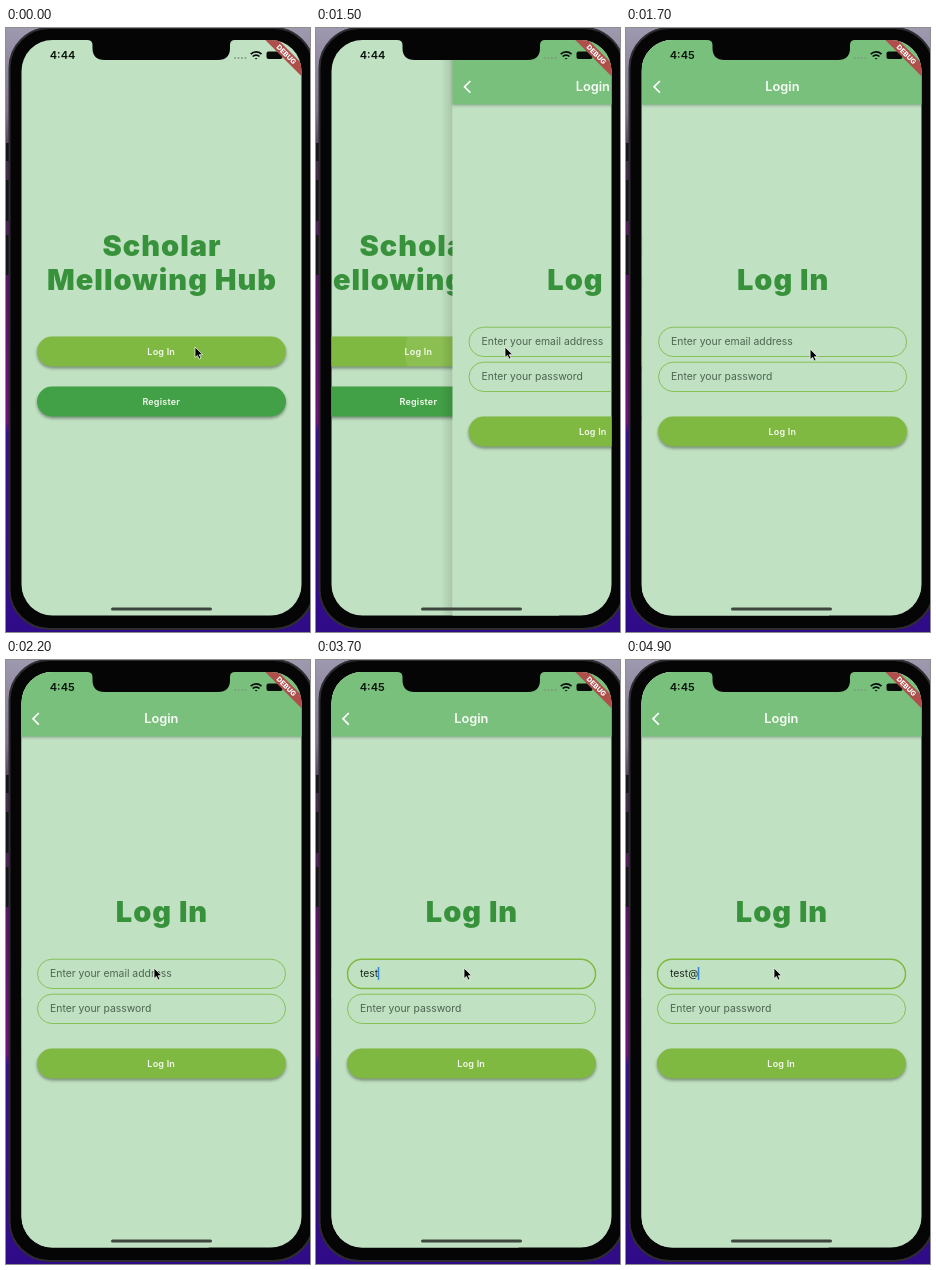
An HTML page for the animation above (5000 ms loop, 304 px wide and 604 px high).

```html
<!DOCTYPE html>
<html lang="en">
<head>
<meta charset="utf-8">
<title>Login walkthrough</title>
<style>
html, body { margin: 0; width: 100%; height: 100%; overflow: hidden; background: #222; }
svg { display: block; width: 304px; height: 604px; font-family: Inter, Roboto, sans-serif; }
.mid { text-anchor: middle; }
.title { font-size: 29px; font-weight: 900; fill: #38923c; letter-spacing: 1px; }
.label { font-size: 9px; font-weight: 600; fill: #f4faef; letter-spacing: .2px; }
.btn { filter: drop-shadow(0 2px 1.5px rgba(0, 0, 0, .36)); }
.input { font-size: 10.4px; fill: #1d2a1e; }
.hint { font-size: 10.4px; fill: #4d6650; }
.field { fill: none; stroke: #86c058; }
</style>
</head>
<body>
<svg viewBox="0 0 304 604">
  <defs>
    <linearGradient id="desk" x2="0" y2="1">
      <stop offset="0" stop-color="#9f99b0"/>
      <stop offset=".14" stop-color="#7d7488"/>
      <stop offset=".22" stop-color="#3f3046"/>
      <stop offset=".42" stop-color="#5c1369"/>
      <stop offset=".65" stop-color="#70127f"/>
      <stop offset=".67" stop-color="#3a0f92"/>
      <stop offset="1" stop-color="#300b88"/>
    </linearGradient>
    <linearGradient id="edge">
      <stop offset="0" stop-opacity="0"/>
      <stop offset="1" stop-opacity=".12"/>
    </linearGradient>
    <clipPath id="screen"><rect x="15.5" y="12" width="280" height="575.5" rx="31"/></clipPath>
    <clipPath id="pill"><rect x="31" y="308.500" width="249" height="30" rx="15"/></clipPath>
  </defs>

  <rect width="304" height="604" fill="url(#desk)"/>
  <path d="M0 115h4v18h-4zM0 152h4v41h-4zM0 207h4v40h-4z" fill="#17131a"/>
  <rect x="3.5" y="0" width="304" height="601" rx="40" fill="#050505" stroke="#2e2c31" stroke-width="2"/>

  <g clip-path="url(#screen)">
    <g id="welcome">
      <rect x="15" y="12" width="281" height="576" fill="#c1e1c3"/>
      <g class="mid">
        <text class="title" x="156" y="228.3">Scholar</text>
        <text class="title" x="156" y="262.3">Mellowing Hub</text>
        <rect class="btn" x="31" y="308.5" width="249" height="30" rx="15" fill="#80b941"/>
        <g clip-path="url(#pill)"><circle id="ripple" cx="190" cy="324" r="48" fill="#fff" opacity=".09"/></g>
        <rect class="btn" x="31" y="358.5" width="249" height="30" rx="15" fill="#42a047"/>
        <text class="label" x="155.2" y="326.7">Log In</text>
        <text class="label" x="155.2" y="376.5">Register</text>
      </g>
    </g>

    <g id="login">
      <rect x="3" y="12" width="12" height="576" fill="url(#edge)"/>
      <rect x="15" y="12" width="281" height="576" fill="#c1e1c3"/>
      <rect x="15" y="12" width="281" height="64.5" fill="#78c07b" style="filter:drop-shadow(0 1.5px 1.5px rgba(0,0,0,.26))"/>
      <path d="M32.8 53l-5.8 5.8 5.8 5.8" fill="none" stroke="#fff" stroke-width="1.7"/>
      <text class="mid" x="155.3" y="63" font-size="12.8" font-weight="600" fill="#f8fdf8">Login</text>
      <text class="title mid" x="156" y="262.3">Log In</text>
      <rect id="email" class="field" x="31.5" y="299.2" width="248" height="29.3" rx="14.6"/>
      <rect class="field" x="31.5" y="334.2" width="248" height="29.3" rx="14.6"/>
      <text id="hint" class="hint" x="44" y="317">Enter your email address</text>
      <text id="typed" class="input" x="44" y="317"></text>
      <rect id="caret" y="307" width="1.5" height="13" fill="#2f86dc"/>
      <text class="hint" x="44" y="352">Enter your password</text>
      <rect class="btn" x="31" y="388.5" width="249" height="30" rx="15" fill="#80b941"/>
      <text class="label mid" x="155.2" y="406.7">Log In</text>
    </g>

    <text id="clock" x="43.8" y="31" font-size="11" font-weight="600" fill="#0b120c"></text>
    <g fill="#7f9b82">
      <circle cx="229" cy="30" r="1"/><circle cx="232.5" cy="30" r="1"/>
      <circle cx="236" cy="30" r="1"/><circle cx="239.5" cy="30" r="1"/>
    </g>
    <g fill="none" stroke="#080c08" stroke-width="1.7">
      <path d="M244.7 26.2a7.6 7.6 0 0 1 10.8 0M246.7 28.5a4.7 4.7 0 0 1 6.8 0"/>
      <path d="M248.7 29.9l1.4 1.5 1.4-1.5z" fill="#080c08" stroke="none"/>
    </g>
    <rect x="260.5" y="23.5" width="16" height="7.5" rx="2" fill="#080c08"/>
    <g transform="translate(280.3 26.500) rotate(45)">
      <rect x="-40" y="-4.6" width="80" height="9.200" fill="#ae4f4c"/>
      <text class="mid" y="2.4" font-size="7" font-weight="800" fill="#fff">DEBUG</text>
    </g>
    <rect x="105" y="579.6" width="101" height="3" rx="1.5" fill="#3d473e"/>
  </g>

  <path d="M81 11h148v1q-5 0-5 5v3q0 12-12 12H98.500q-12 0-12-12v-3q0-5-5.500-5z" fill="#050505"/>
  <path id="pointer" d="M0 0v10.600l2.400-2.200 1.700 3.700 1.900-.8-1.700-3.600h3.300z" fill="#000" stroke="#e9f3e9" stroke-width=".8"/>
</svg>
<script>
const el = id => document.getElementById(id);
const clamp = v => Math.min(1, Math.max(0, v));
const LOOP = 5000, STEP = 100;
const keys = [[3500, "te"], [3600, "tes"], [3700, "test"], [4800, "test@"]];

function pointerAt(t) {
  if (t < 1600) return [189, 319];
  const p = clamp((t - 1600) / 600), e = p * p * (3 - 2 * p);
  return [187 - 39 * e, 322 - 14 * e];
}

// The caret fades out in three steps, 600 ms after the last activity.
function caretAt(t) {
  if (t < 2500) return 0;
  const last = t < 3500 ? 2500 : t < 4800 ? 3700 : 4800;
  return 1 - clamp((t - last - 500) / 300);
}

function draw(t) {
  const left = t < 1500 ? 1 : t > 1800 ? 0 : 0.434 * 0.0945 ** ((t - 1500) / 100);
  el("welcome").setAttribute("transform", `translate(${-280 / 3 * (1 - left)})`);
  el("login").setAttribute("transform", `translate(${280 * left})`);
  el("login").style.display = t < 1500 ? "none" : "";
  el("ripple").style.display = t < 1500 ? "none" : "";
  el("clock").textContent = t < 1600 ? "4:44" : "4:45";
  el("pointer").setAttribute("transform", `translate(${pointerAt(t)})`);

  const focus = clamp((t - 2300) / 200);
  el("hint").style.opacity = 1 - focus;
  el("email").style.strokeWidth = 1 + 0.5 * focus;
  el("email").style.stroke = focus ? "#80b941" : "";

  const typed = el("typed");
  typed.textContent = keys.reduce((text, [at, s]) => t >= at ? s : text, "");
  const width = typed.textContent ? typed.getComputedTextLength() : 0;
  el("caret").setAttribute("x", 44 + width - 0.5);
  el("caret").style.opacity = caretAt(t);
}

const start = performance.now();
function tick() {
  const t = (performance.now() - start) % LOOP;
  draw(Math.floor(t / STEP) * STEP);
  requestAnimationFrame(tick);
}
tick();
</script>
</body>
</html>
```
